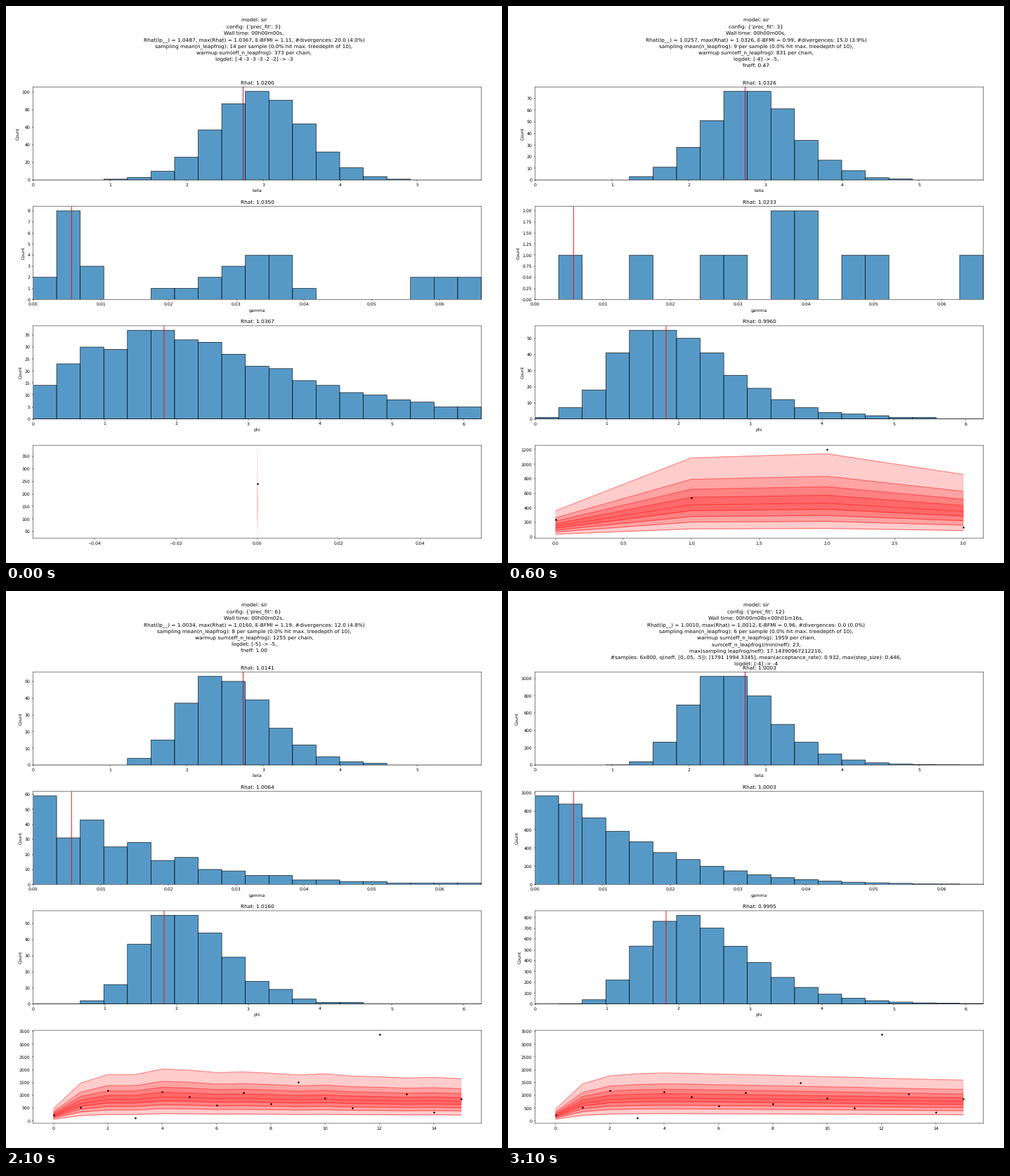
A matplotlib script for the animation above (3600 ms loop, 706x794 px).

```python
import numpy as np
import matplotlib.pyplot as plt
from matplotlib.animation import FuncAnimation

W, H, DPI = 706, 794, 64
S = 44 / DPI              # scale from default sizes to this layout
BINS = 19
BIN = np.arange(BINS)
LINES, LINE_STEP = 10, 9.28

plt.rcParams.update({
    "font.family": "DejaVu Sans", "font.size": 10 * S,
    "text.hinting": "none", "path.snap": False,
    "axes.linewidth": 0.8 * S, "axes.titlepad": 6 * S, "axes.labelpad": 4 * S,
    "lines.linewidth": 1.5 * S, "patch.linewidth": S,
    "lines.markersize": 6 * S, "lines.markeredgewidth": S,
    **{f"{a}tick.major.{k}": v * S for a in "xy"
       for k, v in (("size", 3.5), ("width", 0.8), ("pad", 3.5))},
})

# name, upper x limit, true value, line colour
PARAMS = [("beta", 5.837, 2.7356, "#a8102a"),
          ("gamma", 0.06617, 0.005685, "red"),
          ("phi", 6.246, 1.826, "red")]

OBSERVED = [240, 535, 1203, 130, 1148, 937, 600, 1100,
            660, 1508, 882, 512, 3386, 1050, 345, 852]

# deciles as multiples of the median
DECILES = np.array([0.32, 0.53, 0.69, 0.85, 1, 1.19, 1.385, 1.62, 2.1])


def bell(peak, mode, width, skew=0.01):
    """Bell curve over the bins, leaning right for skew > 0."""
    z = (BIN + 0.5 - mode) / width
    z = np.log(np.maximum(1 + skew * z, 1e-9)) / skew
    return peak * np.exp(-z * z / 2)


def decay(peak, scale, power, wobble=0):
    fall = np.exp(-(BIN / scale) ** power)
    return peak * fall * (1 + wobble * np.cos(np.pi * BIN)) / (1 + wobble)


def sampled(curve, seed):
    """Whole counts with sampling noise, keeping the curve's peak."""
    rng = np.random.default_rng(seed)
    peak = curve.max()
    noisy = curve * (1 + 0.5 / np.sqrt(peak) * rng.normal(size=BINS))
    noisy = np.minimum(noisy, peak)
    noisy[curve.argmax()] = peak
    return np.round(noisy)


def bands(count, level, drop, power, spread, jitter, seed=1):
    """Nine decile curves that rise quickly, then sink slowly."""
    t = np.arange(count)
    median = level * (1 - drop * t ** power) * (1 - 0.77 * np.exp(-t / 0.95))
    wave = 1 + jitter * np.random.default_rng(seed).normal(size=count)
    wave[0] = 1
    return np.outer(DECILES ** spread, median * wave)


def header(prec, wall, stats, leap, warm, *rest):
    return [
        "model: sir", f"config: {{'prec_fit': {prec}}}", f"Wall time: {wall},",
        "Rhat(lp__) = {}, max(Rhat) = {}, E-BFMI = {}, "
        "#divergences: {} ({}%)".format(*stats.split()),
        f"sampling mean(n_leapfrog): {leap} per sample "
        "(0.0% hit max. treedepth of 10),",
        f"warmup sum(eff_n_leapfrog): {warm} per chain,", *rest]


STATES = [
    dict(text=header(3, "00h00m00s", "1.0487 1.0367 1.11 20.0 4.0", 14, 373,
                     "logdet: [-4 -3 -3 -3 -2 -2] -> -3"),
         rhat="1.0200 1.0350 1.0367",
         beta=sampled(bell(101, 9.6, 1.93), 1),
         gamma=np.round(bell(8, 1.5, 0.65) + bell(4, 10, 1.4, -0.5)
                        + bell(2.2, 17.5, 1.15)),
         phi=sampled(bell(37, 4.5, 4, 0.5), 2),
         bands=bands(1, 674, 0, 1, 1.2, 0)),
    dict(text=header(3, "00h00m00s", "1.0312 1.0294 1.04 17.0 3.7", 11, 642,
                     "logdet: [-3] -> -4,", "fneff: 0.38"),
         rhat="1.0187 1.0294 1.0083",
         beta=sampled(bell(90, 9.3, 1.95, 0.03), 3),
         gamma=np.bincount([1, 1, 3, 6, 8, 10, 10, 12, 15, 18], minlength=BINS),
         phi=sampled(bell(46, 4.6, 2.9, 0.45), 4),
         bands=bands(2, 640, 0.02, 1, 1.22, 0)),
    dict(text=header(3, "00h00m00s", "1.0257 1.0326 0.99 15.0 3.9", 9, 831,
                     "logdet: [-4] -> -5,", "fneff: 0.47"),
         rhat="1.0326 1.0233 0.9960",
         beta=sampled(bell(78, 9.1, 1.9, 0.05), 5),
         gamma=np.bincount([1, 4, 7, 8, 10, 10, 11, 11, 13, 14, 18],
                           minlength=BINS),
         phi=sampled(bell(56, 5.1, 2.3, 0.3), 6),
         bands=bands(4, 632, 0.0478, 2, 1.22, 0)),
    dict(text=header(3, "00h00m01s", "1.0282 1.0027 1.13 12.0 2.6", 7, 857,
                     "logdet: [-5] -> -4,", "fneff: 0.09"),
         rhat="0.9976 1.0027 0.9934",
         beta=sampled(bell(126, 7.8, 1.6, 0.2), 7),
         gamma=np.round(17 + 4 * np.cos(np.pi * (BIN - 9.5) / 4)
                        + bell(12.7, 6.5, 0.35)),
         phi=sampled(bell(57, 7.4, 3.1, 0.1), 8),
         bands=bands(8, 895, 0.045, 1, 1.05, 0.015)),
    dict(text=header(3, "00h00m01s", "1.0149 1.0041 0.97 8.0 2.1", 7, 786,
                     "logdet: [-4] -> -5,", "fneff: 0.24"),
         rhat="1.0021 0.9989 1.0041",
         beta=sampled(bell(84, 7.9, 1.75, 0.2), 9),
         gamma=sampled(decay(77, 5, 1.3), 10),
         phi=sampled(bell(72, 6.7, 2.05, 0.17), 11),
         bands=bands(16, 955, 0.014, 1, 1.02, 0.02)),
    dict(text=header(6, "00h00m02s", "1.0034 1.0160 1.19 12.0 4.8", 8, 1255,
                     "logdet: [-5] -> -5,", "fneff: 1.00"),
         rhat="1.0141 1.0064 1.0160",
         beta=sampled(bell(54, 7.8, 1.75, 0.2), 12),
         gamma=sampled(decay(59, 4.8, 1.15, 0.13), 13),
         phi=sampled(bell(57, 6, 1.8, 0.2), 14),
         bands=bands(16, 955, 0.0135, 1, 1.05, 0.025, 2)),
    dict(text=header(12, "00h00m08s", "1.0043 1.0092 1.02 6.0 2.1", 7, 1607,
                     "logdet: [-5] -> -4,", "fneff: 0.86"),
         rhat="1.0052 1.0037 1.0092",
         beta=sampled(bell(60, 7.9, 1.75, 0.22), 15),
         gamma=sampled(decay(56, 5, 1.35), 16),
         phi=sampled(bell(47, 6.2, 2.1, 0.3), 17),
         bands=bands(16, 955, 0.0135, 1, 1.12, 0.025, 3)),
    dict(text=header(12, "00h00m08s+00h01m16s", "1.0010 1.0012 0.96 0.0 0.0",
                     6, 1959, "sum(eff_n_leapfrog)/min(neff): 23,",
                     "max(sampling leapfrog/neff): 17.14390967212216,",
                     "#samples: 6x800, q(neff, [0,.05, .5]): "
                     "[1791 1994 3345], mean(acceptance_rate): 0.932, "
                     "max(step_size): 0.446,",
                     "logdet: [-4] -> -4"),
         rhat="1.0003 1.0003 0.9995",
         beta=sampled(bell(1060, 7.95, 1.75, 0.22), 18),
         gamma=sampled(decay(970, 5, 1.35), 19),
         phi=sampled(bell(825, 6.25, 2.14, 0.3), 20),
         bands=bands(16, 954, 0.0135, 1, 1, 0.005)),
]

fig = plt.figure(figsize=(W / DPI, H / DPI), dpi=DPI, facecolor="white")
axes = [fig.add_axes([38.5 / W, 1 - (115.4 + 170.25 * i + 132.7) / H,
                      638 / W, 132.7 / H]) for i in range(4)]
heading = [fig.text(0.5, 1 - (22.2 + LINE_STEP * i) / H, "", ha="center",
                    va="baseline", fontsize=12 * S) for i in range(LINES)]


def draw_hist(ax, counts, param, rhat):
    name, top, truth, color = param
    edges = np.linspace(0, top, BINS + 1)
    ax.bar(edges[:-1], counts, width=top / BINS, align="edge",
           facecolor=(0.122, 0.467, 0.706, 0.75), edgecolor="black")
    ax.axvline(truth, color=color)
    ax.set(xlim=(0, top), ylim=(0, counts.max() * 1.05),
           xlabel=name, ylabel="Count")
    ax.set_title(f"Rhat: {rhat}", fontsize=12 * S)


def draw_bands(ax, curves):
    t = np.arange(len(curves[0]))
    for i in range(4):
        ax.fill_between(t, curves[i], curves[8 - i], color="red", alpha=0.2)
    for curve in curves:
        ax.plot(t, curve, color="red", alpha=0.5)
    ax.plot(t, OBSERVED[:len(t)], "k.")


def update(i):
    # the first state lasts one step, all others five
    state = STATES[(i + 4) // 5]
    for n, line in enumerate(heading):
        line.set_text(state["text"][n] if n < len(state["text"]) else "")
    for ax in axes:
        ax.clear()
    for ax, param, rhat in zip(axes, PARAMS, state["rhat"].split()):
        draw_hist(ax, state[param[0]], param, rhat)
    draw_bands(axes[3], state["bands"])
    return axes


anim = FuncAnimation(fig, update, frames=36, interval=100,
                     init_func=lambda: axes, repeat=True, repeat_delay=0)
plt.show()
```
